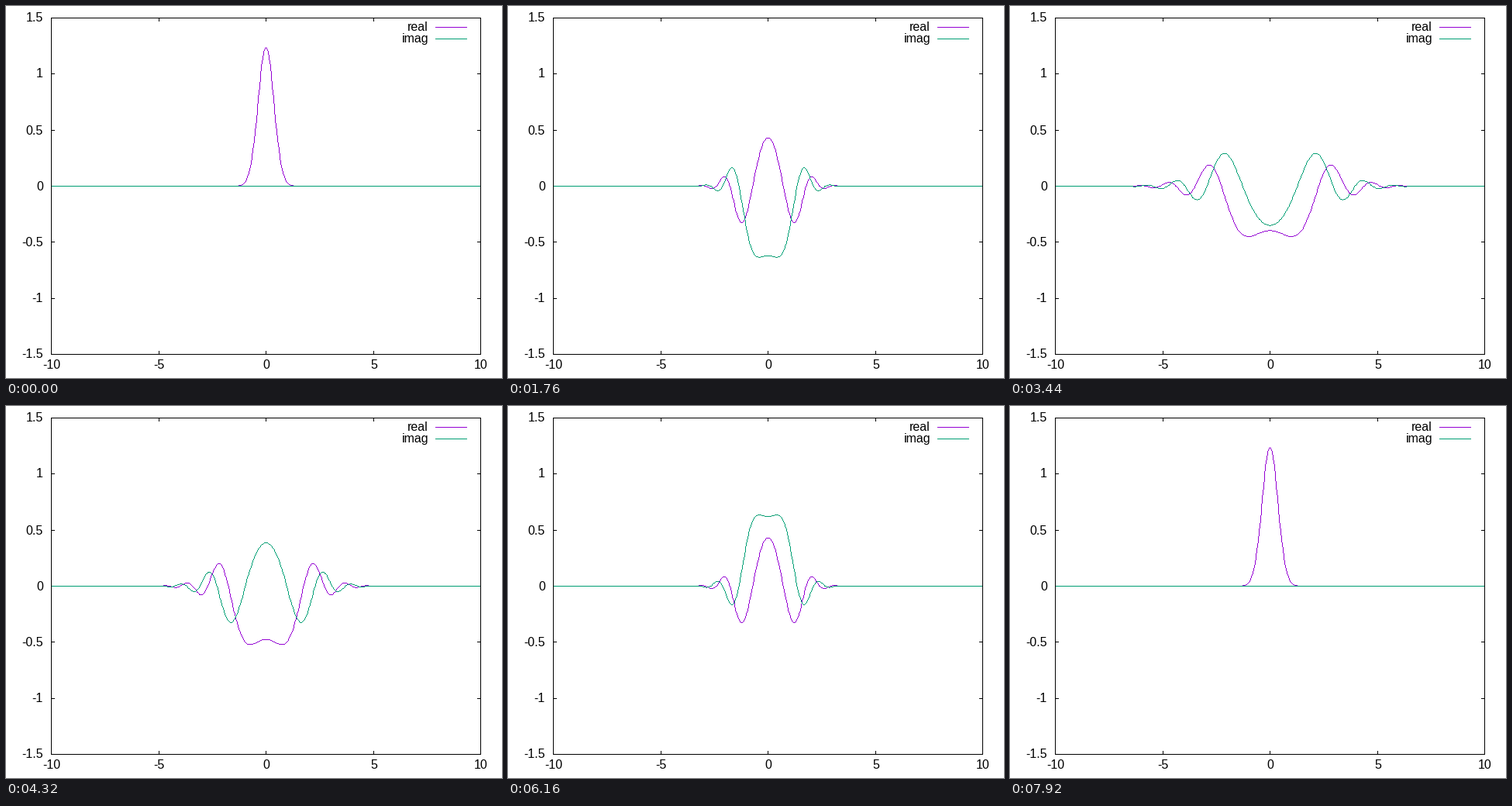
A matplotlib script that plays this animation: 640 px wide and 480 px high, repeating every 8 s.

```python
import numpy as np
import matplotlib.pyplot as plt
from matplotlib.animation import FuncAnimation

W, H, DPI = 640, 480, 80
FRAMES, INTERVAL = 100, 80
LEFT, RIGHT, BOTTOM, TOP = 58, 612, 30, 464
PURPLE, TEAL = "#9400D3", "#009E73"
SQUEEZE = np.exp(2)  # initial width parameter of the packet

plt.rcParams["font.family"] = "Liberation Sans"
fig = plt.figure(figsize=(W / DPI, H / DPI), dpi=DPI, facecolor="white")
ax = fig.add_axes([0, 0, 1, 1])
ax.set(xlim=(0, W), ylim=(0, H))
ax.axis("off")


def to_px(x):
    return np.floor(LEFT + (RIGHT - LEFT) * (x + 10) / 20 + 0.5)


def to_py(y):
    return np.floor(BOTTOM + (TOP - BOTTOM) * (y + 1.5) / 3 + 0.5)


def trace(px, py):
    """Whole pixels along a polyline, one per step of the longer axis."""
    dx, dy = np.diff(px), np.diff(py)
    n = np.maximum(np.abs(dx), np.abs(dy)).astype(int)
    seg = np.repeat(np.arange(n.size), n)
    part = (np.arange(n.sum()) - (np.cumsum(n) - n)[seg]) / n[seg]
    xs = np.append(px[:-1][seg] + part * dx[seg], px[-1])
    ys = np.append(py[:-1][seg] + part * dy[seg], py[-1])
    return np.floor(xs + 0.5), np.floor(ys + 0.5)


def pixels(px, py, color, z):
    xs, ys = trace(np.array(px, float), np.array(py, float))
    return ax.plot(xs, ys, ls="", marker=",", color=color, zorder=z)[0]


def label(x, y, text, align):
    ax.text(x, y, text, ha=align, va="baseline", size=14.4, color="black")


def psi(x, t):
    """Squeezed vacuum in a harmonic well, with a continuous phase."""
    c, s = np.cos(t), np.sin(t)
    d = c + 1j * SQUEEZE * s
    phase = t + np.angle(d * np.exp(-1j * t))
    amp = (SQUEEZE / np.pi) ** 0.25 / np.sqrt(abs(d)) * np.exp(-0.5j * phase)
    return amp * np.exp(-x**2 / 2 * (SQUEEZE * c + 1j * s) / d)


# axes, ticks and labels
pixels([LEFT, RIGHT, RIGHT, LEFT, LEFT], [BOTTOM, BOTTOM, TOP, TOP, BOTTOM], "black", 4)
for v in (-10, -5, 0, 5, 10):
    p = to_px(v)
    pixels([p, p], [BOTTOM, BOTTOM + 4], "black", 1)
    pixels([p, p], [TOP - 4, TOP], "black", 1)
    label(p + 0.5, 11.5, f"{v}", "center")
for v in (-1.5, -1, -0.5, 0, 0.5, 1, 1.5):
    p = to_py(v)
    pixels([LEFT, LEFT + 4], [p, p], "black", 1)
    pixels([RIGHT - 4, RIGHT], [p, p], "black", 1)
    label(48, p - 4.5, f"{v:g}", "right")

# key
for name, color, y in (("real", PURPLE, 452), ("imag", TEAL, 437)):
    label(545, y - 3.5, name, "right")
    pixels([554, 594], [y, y], color, 1)

x = np.linspace(-10, 10, 401)
px = to_px(x)
real = pixels(px, to_py(0 * x), PURPLE, 2)
imag = pixels(px, to_py(0 * x), TEAL, 3)


def draw(i):
    wave = psi(x, 4 * np.pi * i / (FRAMES - 1))
    # rounding keeps the flat tails on one pixel row
    real.set_data(*trace(px, to_py(np.round(wave.real, 6))))
    imag.set_data(*trace(px, to_py(np.round(wave.imag, 6))))
    return real, imag


anim = FuncAnimation(fig, draw, frames=FRAMES, interval=INTERVAL, repeat=True, repeat_delay=0)
plt.show()
```
